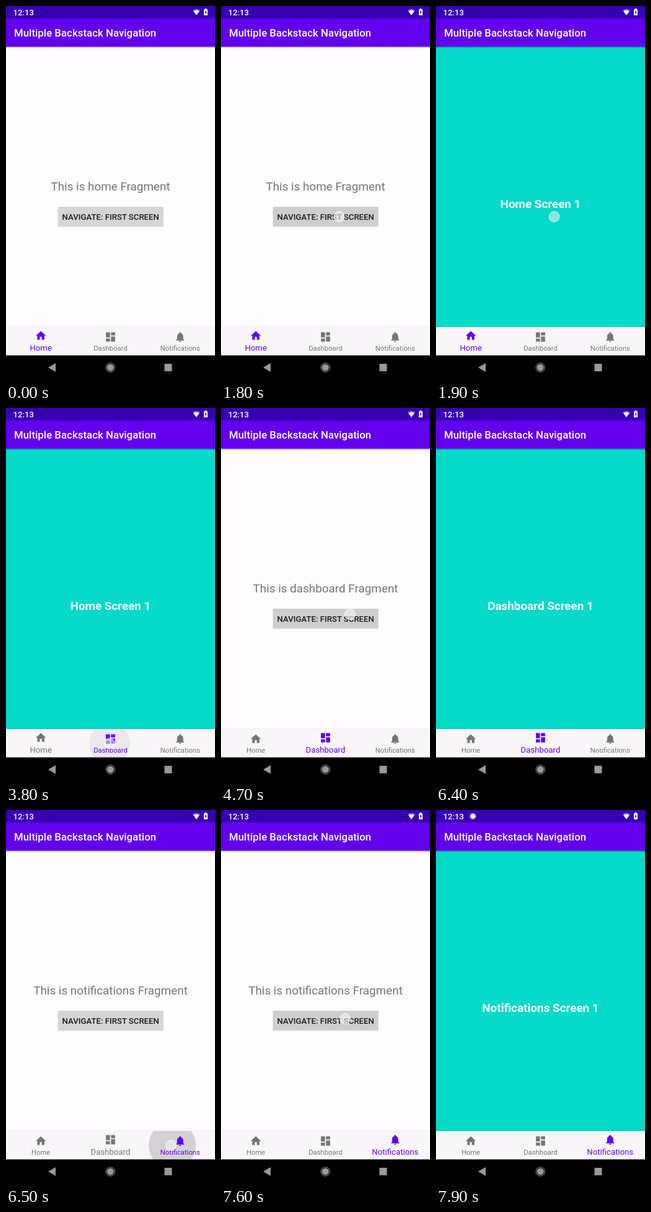
Animation, 337 px wide and 600 px high, one loop 8 s. Source, as an HTML page:

```html
<!DOCTYPE html>
<html lang="en">
<head>
<meta charset="utf-8">
<title>Backstack navigation</title>
<style>
  html, body { margin: 0; width: 100%; height: 100%; overflow: hidden; background: #000; }
  svg { display: block; width: 337px; height: 600px; font-family: Roboto, sans-serif; }
  .mid { text-anchor: middle; }
  .medium { font-weight: 500; }
  .tab { fill: #757575; font-size: 11.3px; }
  .tab.on { fill: #6200ee; }
</style>
</head>
<body>
<svg viewBox="0 0 337 600">
  <defs>
    <linearGradient id="shade" x2="0" y2="1">
      <stop stop-opacity=".2"/><stop offset="1" stop-opacity="0"/>
    </linearGradient>
    <clipPath id="navClip"><path d="M0 515h337v45.5H0z"/></clipPath>
  </defs>

  <rect id="page" y="65" width="337" height="450"/>
  <g id="fragment">
    <text id="intro" class="mid" x="168.5" y="296" font-size="18.86" fill="#757575"></text>
    <rect x="83.5" y="322.5" width="170.5" height="32" rx="1.5" opacity=".12"/>
    <rect id="button" x="84" y="322" width="169.5" height="31" rx="1"/>
    <text class="mid medium" x="168.7" y="342.6" font-size="13.2" fill="#1c1b1c">NAVIGATE: FIRST SCREEN</text>
  </g>
  <text id="screen" class="mid" x="168.5" y="324" font-size="18.86" font-weight="700" fill="#fff"></text>

  <path d="M0 65.5h337v3H0z" fill="url(#shade)"/>
  <path d="M0 0h337v65.5H0z" fill="#6200ee"/>
  <path d="M0 0h337v20H0z" fill="#3700b3"/>
  <text class="medium" x="13" y="49" font-size="16.85" fill="#fff">Multiple Backstack Navigation</text>
  <g fill="#fff">
    <text class="medium" x="11.5" y="15" font-size="13.2">12:13</text>
    <path d="M301 7q6-4.5 12 0l-6 8z" opacity=".4"/>
    <path d="M302.3 8.5q4.7-3.3 9.4 0l-4.7 6.3z"/>
    <path d="M319 5.5h1.6V4h2.8v1.5h1.6V15h-6z"/>
    <path d="M322.6 6.8l-2.2 3.8h1.3v2.9l2.1-3.9h-1.2z" fill="#3700b3"/>
    <g id="notice">
      <circle cx="59.5" cy="10" r="3.7"/>
      <circle cx="59.5" cy="10" r="4.5" fill="none" stroke="#fff" stroke-width="1.3" stroke-dasharray="1.2 .9"/>
    </g>
  </g>

  <path d="M0 513.5h337v2H0z" opacity=".04"/>
  <path d="M0 515h337v46H0z" fill="#f9f6f9"/>
  <g clip-path="url(#navClip)"><circle id="ripple" cy="538"/></g>
  <g id="tabs"></g>

  <path d="M0 560.5h337v39.5H0z"/>
  <g fill="#999">
    <path d="M68 580l12-7v14z"/>
    <circle cx="168.3" cy="580" r="5.6"/>
    <circle cx="168.3" cy="580" r="7.2" fill="none" stroke="#999"/>
    <path d="M255.5 574h12v12h-12z"/>
  </g>
  <circle id="touch" r="8.3" fill="#f4f4f4" fill-opacity=".6" stroke="#fff"/>
</svg>
<script>
const LOOP = 8000, STEP = 100;
const $ = id => document.getElementById(id);

const TABS = [
  { name: 'Home', icon: 'M10 20v-6h4v6h5v-8h3L12 3 2 12h3v8z' },
  { name: 'Dashboard', icon: 'M3 13h8V3H3zm0 8h8v-6H3zm10 0h8V11h-8zm0-18v6h8V3z' },
  { name: 'Notifications', icon: 'M12 22c1.1 0 2-.9 2-2h-4c0 1.1.9 2 2 2zm6-6v-5c0-3.07-1.64-5.64-4.5-6.32V4c0-.83-.67-1.5-1.5-1.5s-1.5.67-1.5 1.5v.68C7.63 5.36 6 7.92 6 11v5l-2 2v1h16v-1l-2-2z' }
];
// picked: tab recolours, grown: tab resizes, shown: fragment appears, opened: inner screen appears
const VISITS = [
  { picked: 0, grown: 0, shown: 0, opened: 1900 },
  { picked: 3800, grown: 3900, shown: 3900, opened: 4800 },
  { picked: 6500, grown: 6600, shown: 6500, opened: 7700 }
];
const TOUCHES = [
  { x: 190.5, y: 338, start: 1800, end: 2100 },
  { x: 167, y: 538, start: 3700, end: 4000 },
  { x: 208, y: 331, start: 4700, end: 4900 },
  { x: 266, y: 538, start: 6400, end: 6700 },
  { x: 200, y: 335, start: 7600, end: 7900 }
];
const RIPPLES = [
  { x: 167, start: 3800, radius: 33, alpha: .06 },
  { x: 268, start: 6500, radius: 38, alpha: .15 }
];

$('tabs').innerHTML = TABS.map(({ name, icon }, i) => {
  const x = 56.17 + i * 112.33;
  return `<g class="tab"><g data-x="${x}"><path d="${icon}" transform="scale(.82) translate(-12 -12)"/></g>
    <text class="mid" x="${x}" y="552.6">${name}</text></g>`;
}).join('');
const tabs = [...$('tabs').children];

const latest = (key, t) => VISITS.findLastIndex(v => t >= v[key]);
const show = (el, on) => el.setAttribute('visibility', on ? 'visible' : 'hidden');
const set = (el, attrs) => Object.entries(attrs).forEach(([k, v]) => el.setAttribute(k, v));

function draw(t) {
  const current = latest('shown', t), { name } = TABS[current];
  const opened = t >= VISITS[current].opened;
  const touch = TOUCHES.find(p => t >= p.start && t < p.end);
  const ripple = RIPPLES.find(r => t >= r.start && t < r.start + 400);

  set($('page'), { fill: opened ? '#03dac8' : '#fefcfe' });
  show($('fragment'), !opened);
  show($('screen'), opened);
  $('intro').textContent = `This is ${name.toLowerCase()} Fragment`;
  $('screen').textContent = `${name} Screen 1`;
  set($('button'), { fill: touch && touch.y < 500 ? '#cfcecf' : '#d6d5d6' });

  const picked = latest('picked', t), grown = latest('grown', t);
  tabs.forEach((tab, i) => {
    const [icon, label] = tab.children;
    tab.classList.toggle('on', i === picked);
    set(icon, { transform: `translate(${icon.dataset.x} ${i === grown ? 529 : 531})` });
    label.style.fontSize = i === grown ? '13.2px' : '11.3px';
  });

  show($('touch'), touch);
  if (touch) {
    const fade = (t - touch.start) / (touch.end - touch.start);
    set($('touch'), { cx: touch.x, cy: touch.y, opacity: 1 - fade * fade });
  }
  show($('ripple'), ripple);
  if (ripple) {
    const age = (t - ripple.start) / 400;
    set($('ripple'), { cx: ripple.x, r: ripple.radius + 50 * age, opacity: ripple.alpha * (1 - age) });
  }
  show($('notice'), t >= 7900);
}

function tick() {
  draw(Math.floor(performance.now() % LOOP / STEP) * STEP);
  requestAnimationFrame(tick);
}
tick();
</script>
</body>
</html>
```
